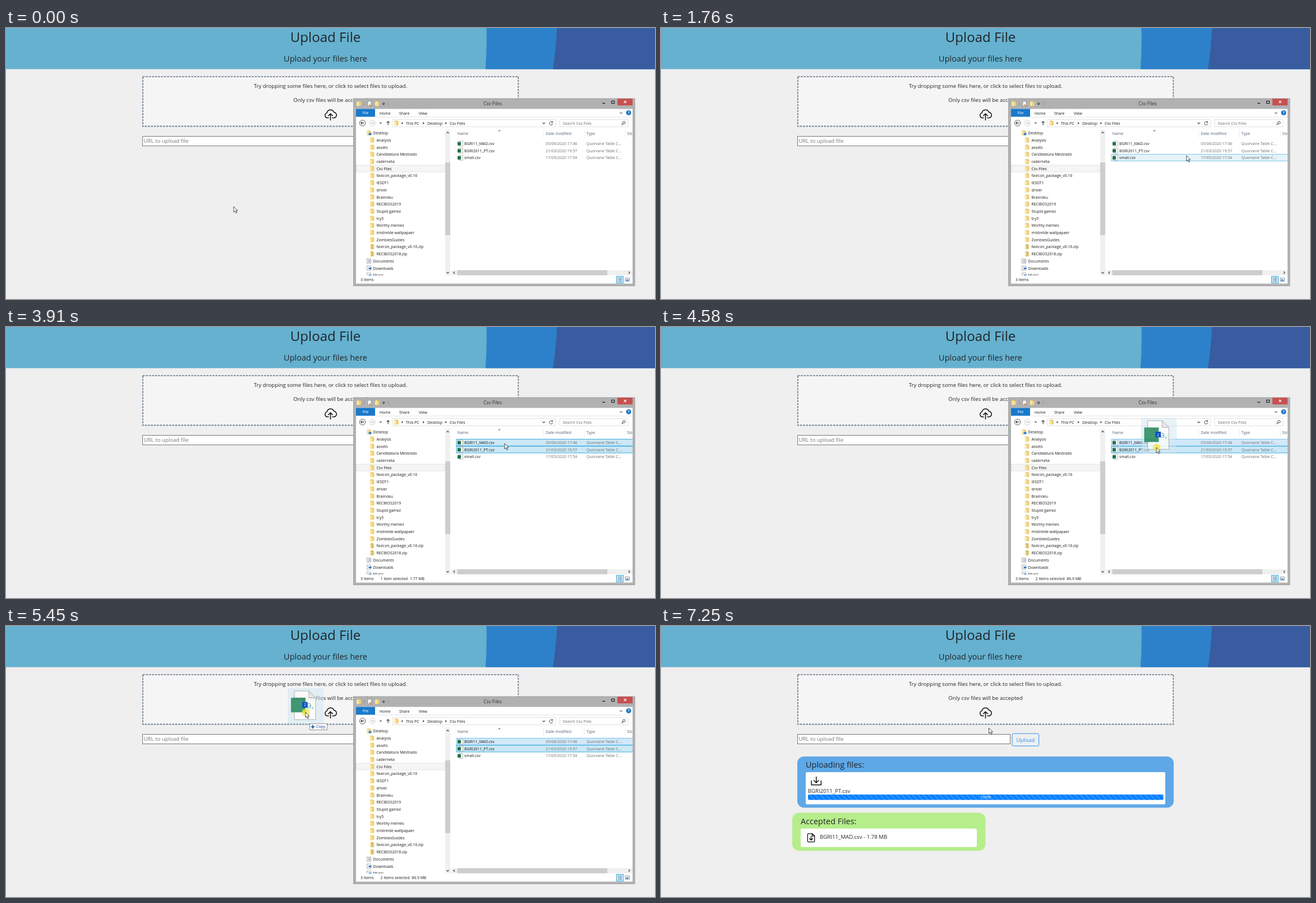
Recreate the animation shown at these times as an HTML page. Size 1157 by 484 pixels, loop 8 s.

```html
<!DOCTYPE html>
<html lang="en">
<head>
<meta charset="utf-8">
<title>Upload File</title>
<style>
html, body { margin: 0; width: 100%; height: 100%; overflow: hidden; background: #efefef; }
svg { display: block; }
text { font-family: "Open Sans", "Noto Sans", sans-serif; white-space: pre; }
#win text, #label text { font-size: 6.9px; }
</style>
</head>
<body>
<svg id="stage" width="1157" height="484" viewBox="0 0 1157 484"></svg>
<script>
const LOOP = 8000, INK = "#212529", TREE_TOP = 187.6, PITCH = 12.7, BAR = 634;
const $ = id => document.getElementById(id);

// ---- drawing helpers ----
const rect = (x, y, w, h, fill, more = "") =>
  `<rect x="${x}" y="${y}" width="${w}" height="${h}" fill="${fill}" ${more}/>`;
const text = (x, y, str, size, fill = INK, more = "") =>
  `<text x="${x}" y="${y}" style="font-size:${size}px" fill="${fill}" ${more}>${str}</text>`;
const line = (d, stroke = "#444", width = 1, more = "") =>
  `<path d="${d}" fill="none" stroke="${stroke}" stroke-width="${width}" ${more}/>`;
const shape = (d, fill, more = "") => `<path d="${d}" fill="${fill}" ${more}/>`;
const at = (x, y, body, more = "") => `<g transform="translate(${x} ${y})" ${more}>${body}</g>`;
const small = (x, y, str, fill = "#1a1a1a", size = 6.9) => text(x, y, str, size, fill);
const mid = 'text-anchor="middle"';
const round = 'stroke-linecap="round" stroke-linejoin="round"';

const folder = (x, y, zip) => at(x, y,
  shape("M1 .6L5.5 0L6.3 1L8 1.2V8.6L1 9Z", "#e3bb55") +
  shape("M.6 1.6L4.6 .8V9.3L.6 8.4Z", "#fae7a6") +
  shape("M4.6 2L8.4 1.6V8.2L4.6 9.3Z", "#f0d07a") +
  (zip ? line("M4.5 1V8.6", "#555", 1.2, 'stroke-dasharray="1 .8"') : ""));
const chevron = (x, y, dir, color = "#444") =>
  at(x, y, `<g transform="rotate(${dir})">${line("M-2.2 -1.1L0 1.1L2.2 -1.1", color, 1.1)}</g>`);
const crumb = x => shape(`M${x} 167.8l2.4 2.2l-2.4 2.2z`, "#333");

// ---- web page ----
const page =
  rect(0, 0, 1157, 73.5, "#65b1cf") +
  shape("M856.5 0Q857.6 36 854.8 73.5H1157V0Z", "#2d81cb") +
  shape("M982.3 0Q980.5 38 975 73.5H1157V0Z", "#385c9f") +
  text(569.5, 25, "Upload File", 24.1, INK, mid) +
  text(569.5, 59.8, "Upload your files here", 14.47, INK, mid) +
  rect(243.9, 86.9, 669.4, 88.6, "#f5f5f5", 'stroke="slategray" stroke-width="1.8" stroke-dasharray="3.6 1.8"') +
  text(578.5, 107.4, "Try dropping some files here, or click to select files to upload.", 9.66, INK, mid) +
  text(578.5, 131.6, "Only csv files will be accepted", 9.66, INK, mid) +
  line("M575 160.6H573A4.6 4.6 0 0 1 572.2 151.6A6.4 6.4 0 0 1 584.6 150.6A5 5 0 0 1 584 160.6H582", "#111", 1.5, round) +
  line("M578.5 164.5V153.2M574.9 156.6L578.5 153L582.1 156.6", "#111", 1.5, round) +
  rect(243.5, 193.5, 379, 17, "#fff", 'stroke="#767676"') +
  text(245.6, 205.2, "URL to upload file", 9.66, "#757575") +
  rect(626, 192.2, 47.6, 22, "none", 'rx="2.4" stroke="#3191f3"') +
  text(649.8, 206.6, "Upload", 9.7, "#2b8ef5", mid);

const item = (id, y, name) => at(0, y,
  line("M276.8 8.4V18.6M272.6 14.8L276.8 19L281 14.8M268.2 15.6V22.8H285.4V15.6", "#111", 1.5, round) +
  text(261.7, 36.6, name, 9.68) +
  at(261.8, 40,
    rect(0, 0, BAR, 9.65, "#e9ecef", 'rx="2.4"') +
    `<svg id="${id}Bar" width="0" height="9.65">
      ${rect(0, 0, BAR, 9.65, "#007bff", 'rx="2.4"')}${rect(0, 0, BAR, 9.65, "url(#stripes)", 'rx="2.4"')}
      ${text(0, 7.4, "", 7.24, "#fff", `id="${id}Pct" text-anchor="middle"`)}</svg>`),
  `id="${id}"`);

const panels =
  `<g id="uploads">
    ${rect(243, 233, 671, 149, "#5ea8e8", 'rx="12" id="upBox"')}
    ${text(258, 252.6, "Uploading files:", 14.47)}
    ${rect(258, 261, 641, 115, "#fff", 'rx="2.4" id="upList"')}
    ${line("M258 318.3H899", "#dfdfdf", .8, 'id="divider"')}
    ${item("one", 261, "BGRI11_MAD.csv")}${item("two", 318.4, "BGRI2011_PT.csv")}
  </g>
  <g id="accepted">
    ${rect(234, 333.5, 344.5, 68, "#b6ee8b", 'rx="12"')}
    ${text(249, 353.6, "Accepted Files:", 14.47)}
    ${rect(249, 361.8, 314, 33, "#fff", 'rx="2.4"')}
    ${line("M262.6 370.8H269.6L273.8 375V384.2Q273.8 385.6 272.4 385.6H262.8Q261.4 385.6 261.4 384.2V372Q261.4 370.8 262.6 370.8ZM269.4 371V375.2H273.6", "#111", 1.3, round)}
    ${line("M267.6 375.6V382M264.8 379.6L267.6 382.4L270.4 379.6", "#111", 1.4, round)}
    ${text(283, 380.4, "BGRI11_MAD.csv - 1.78 MB", 9.68)}
  </g>`;

// ---- file window ----
const TREE = ["Desktop", "Analysis", "assets", "Candidatura Mestrado", "caderneta", "Csv Files",
  "favicon_package_v0.16", "IESDT1", "driver", "Bramoku", "RECIBOS2019", "Stupid gamez", "try5",
  "Worthy memes", "mistrelde wallpapaer", "ZombiesGuides", "favicon_package_v0.16.zip",
  "RECIBOS2018.zip", "Documents", "Downloads", "Music"];
const FILES = [["BGRI11_MAD.csv", "05/06/2020 17:46"], ["BGRI2011_PT.csv", "21/03/2020 19:57"],
  ["small.csv", "17/05/2020 17:54"]];
const rowTop = i => 200.3 + 12.65 * i;

const treeRow = (name, i) => {
  const y = TREE_TOP + PITCH * i, top = i === 0 || i > 17, x = top ? 642.5 : 648;
  const icon = top && i > 17
    ? rect(x + 1, y - 4, 7, 8, "#f4f4f4", 'stroke="#999" stroke-width=".7"') +
      (i === 18 ? line(`M${x + 3} ${y - 1.6}h4m-4 1.8h4m-4 1.8h4`, "#5c7fa8", .7)
                : shape(`M${x + 4} ${y - 1}h5v3h-5z`, "#2f7fd0"))
    : folder(x, y - 4.7, name.endsWith(".zip")) + (i ? "" : rect(x + 4, y, 5, 3.6, "#2f7fd0"));
  return icon + small(top ? 654.6 : 660.5, y + 2.6, name);
};
const fileRow = ([name, date], i) => {
  const y = rowTop(i) + 6.3;
  return rect(803, rowTop(i), 320, 12, "none", `id="row${i}" stroke-width=".9"`) +
    rect(807.5, y - 4.6, 6.8, 9, "#fff", 'stroke="#9a9a9a" stroke-width=".7"') +
    rect(805, y - 3, 6, 6, "#217346") +
    small(817, y + 2.5, name) + small(962.3, y + 2.5, date, "#6d6d6d") +
    small(1034.8, y + 2.5, "Quorvane Table C...", "#6d6d6d");
};

const win = `<g id="win">
  ${rect(619.4, 126, 501.6, 334.6, "#b1b1b1", 'stroke="#979797" stroke-width=".8"')}
  ${rect(624, 144.5, 493, 312, "#fff")}
  ${folder(624.5, 130.3)}${folder(657.3, 130.3)}
  ${rect(645, 131, 6, 8, "#fff", 'stroke="#888" stroke-width=".7"')}
  ${line("M647.6 136.6L651 139.4", "#d07b2c", 1.4)}
  ${line("M638.5 131.5V138.5M681.5 131.5V138.5", "#8a8a8a", .7)}
  ${line("M671 134H675.4", "#222", .8)}${shape("M671 135.4h4.4l-2.2 2.2z", "#222")}
  ${text(867.6, 138, "Csv Files", 8.4, "#333", mid)}
  ${line("M1063.4 134.4H1068", "#111", 1.3)}
  ${rect(1079.6, 130.4, 5, 4.2, "none", 'stroke="#111"')}
  ${rect(1090, 126.2, 27, 12, "#c75050")}
  ${line("M1101.6 130L1105.8 134.2M1105.8 130L1101.6 134.2", "#fff", 1.1)}
  ${rect(624, 144.5, 34, 14, "#1979ca")}
  ${text(641, 154.3, "File", 6.9, "#fff", mid)}
  ${small(666, 154.6, "Home")}${small(701, 154.6, "Share")}${small(736, 154.6, "View")}
  ${line("M658 159H1117", "#dadbdc", .8)}
  ${chevron(1096.5, 151.8, 0, "#666")}
  <circle cx="1110" cy="151.4" r="4.5" fill="#1673c4"/>
  ${text(1110, 154.1, "?", 7.4, "#fff", mid + ' font-weight="700"')}
  <circle cx="635.6" cy="169.8" r="5.2" fill="none" stroke="#555"/>
  ${line("M638.6 169.8H632.8M635.2 167.4L632.8 169.8L635.2 172.2", "#333", 1.1)}
  <circle cx="653" cy="169.8" r="5.2" fill="none" stroke="#c4c4c4" stroke-width=".8"/>
  ${line("M650.2 169.8H655.8M653.4 167.4L655.8 169.8L653.4 172.2", "#bbb")}
  ${shape("M665.6 168.8h4.6l-2.3 2.4z", "#555")}
  ${line("M681.2 173.4V166.8M678.6 169.4L681.2 166.8L683.8 169.4", "#444", 1.2)}
  ${rect(688.9, 163.6, 291, 12.8, "none", 'stroke="#d9d9d9" stroke-width=".8"')}
  ${rect(987, 163.6, 122, 12.8, "none", 'stroke="#d9d9d9" stroke-width=".8"')}
  ${folder(691.4, 165.2)}${crumb(705.6)}${crumb(743.4)}${crumb(783.4)}
  ${small(713, 172.5, "This PC", "#1a1a1a", 7)}${small(751, 172.5, "Desktop", "#1a1a1a", 7)}${small(791, 172.5, "Csv Files", "#1a1a1a", 7)}
  ${chevron(958.8, 170, 0)}
  ${line("M974 168.2A3 3 0 1 0 974.8 170.6M974.4 166.4V168.6H972.2", "#444", 1)}
  ${small(992.6, 172.5, "Search Csv Files", "#6d6d6d", 7)}
  <circle cx="1101.8" cy="169" r="2.2" fill="none" stroke="#444"/>${line("M1100.2 170.6L1097.4 173.4", "#444", 1.2)}
  <g clip-path="url(#treeClip)">
    ${rect(624.4, 245, 157.6, 12, "#f5f5f5", 'stroke="#dedede" stroke-width=".8"')}
    ${rect(624.4, 0, 157.6, 12, "#cbe8f6", 'id="treeHot" stroke="#26a0da" stroke-width=".9"')}
    ${TREE.map(treeRow).join("")}
  </g>
  ${rect(783, 181.5, 9, 260.5, "#f0f0f0")}${rect(783, 240, 9, 130, "#cdcdcd")}
  ${chevron(787.5, 187, 180)}${chevron(787.5, 437, 0)}
  <g clip-path="url(#listClip)">
    ${small(804.8, 191.4, "Name", "#4c607a")}${small(962.3, 191.4, "Date modified", "#4c607a")}
    ${small(1034.8, 191.4, "Type", "#4c607a")}${small(1107.4, 191.4, "Size", "#4c607a")}
    ${line("M958.5 182V196M1031 182V196M1104 182V196", "#e6e6e6", .8)}
    ${shape("M877 184.2l2.5 -2.2l2.5 2.2z", "#777")}
    ${FILES.map(fileRow).join("")}
  </g>
  ${rect(793.5, 432.6, 323.5, 9, "#f0f0f0")}${rect(804.5, 432.6, 267.5, 9, "#cdcdcd")}
  ${chevron(799, 437, 90)}${chevron(1111, 437, -90)}
  ${small(632, 452, "3 items")}${text(667.8, 452, "", 6.9, "#1a1a1a", 'id="status"')}
  ${rect(1088.4, 443.4, 12, 12, "#cbe8f6", 'stroke="#26a0da" stroke-width=".9"')}
  ${line("M1091 446.6h1.6m1 0h4M1091 449.4h1.6m1 0h4M1091 452.2h1.6m1 0h4", "#456", .9)}
  ${rect(1104, 446.6, 7.4, 5.6, "#fff", 'stroke="#678" stroke-width=".8"')}
  ${rect(1105.4, 449, 4.6, 2.4, "#3c87cc")}
</g>`;

// ---- pointer and dragged files ----
const pointer =
  `<g id="drag">
    <g opacity=".85">
      ${rect(-31, -48, 62, 62, "#d3e7f2", 'opacity=".6" stroke="#b3d3e6" stroke-width=".8"')}
      ${shape("M-20 -44H6L18 -32V7H-20Z", "#fbfbfb", 'stroke="#9c9c9c" stroke-width=".9"')}
      ${shape("M6 -44V-32H18Z", "#e6e6e6", 'stroke="#9c9c9c" stroke-width=".9"')}
      ${text(2, -13, "a,", 16, "#45b3a6")}
      ${rect(-26, -32, 26, 26, "#21875a")}
    </g>
    ${rect(-6, -24.4, 9.6, 10, "#0a4fc4")}
    ${text(-1.2, -16.8, "2", 7.4, "#fff", mid)}
    <g id="label" transform="translate(7.4 14.2)">
      ${rect(0, 0, 32, 11.2, "#fff", 'id="tip" stroke="#8a8a8a" stroke-width=".9"')}
      ${line("M2.4 5.6H8.2M5.6 2.9L8.4 5.6L5.6 8.3", "#0a4fa8", 1.5, 'id="moveIcon"')}
      ${line("M2.2 5.6H8.8M5.5 2.3V8.9", "#0a4fa8", 1.7, 'id="copyIcon"')}
      ${text(11.6, 8.1, "", 6.9, "#17367f", 'id="tipText"')}
    </g>
  </g>
  <g id="cursor">
    <circle id="press" r="7" cx=".6" cy=".6" fill="#f3e64c" opacity=".8"/>
    ${shape("M0 0V9.8L2.3 7.7L4 11.6L5.6 10.9L4 7.2H7Z", "#fff", 'stroke="#222" stroke-width=".8"')}
  </g>`;

$("stage").innerHTML = `<defs>
  <pattern id="stripes" width="9.65" height="9.65" patternUnits="userSpaceOnUse">
    <g transform="scale(9.65)">${shape("M0 .5L.5 1H0ZM0 0L1 1V.5L.5 0Z", "#fff", 'opacity=".15"')}</g>
  </pattern>
  <clipPath id="treeClip">${rect(624, 181.5, 159, 260.5, "#000")}</clipPath>
  <clipPath id="listClip">${rect(793, 181, 324, 252, "#000")}</clipPath>
</defs>` + page + panels + win + pointer;

// ---- motion ----
const PATH = [[0, 406, 319], [710, 406, 319], [1000, 600, 322], [1300, 880, 292], [1510, 986, 257],
  [1760, 937, 228], [1960, 903, 211], [2160, 890, 206], [3020, 890, 206], [3220, 903, 243],
  [3490, 898, 217], [3690, 898, 217], [3910, 889, 208], [4400, 889, 210], [4520, 889, 210],
  [4730, 838, 248], [4900, 719, 296], [4930, 694, 301], [5080, 606, 278], [5300, 535, 200],
  [5450, 534, 154], [5570, 537, 140], [6030, 537, 140], [6350, 536.5, 150], [6810, 584.5, 182], [LOOP, 584.5, 182]];
const WIDTH1 = [[6180, 0], [6350, 47], [6480, 82], [6620, 96], [6780, 100], [LOOP, 100]];
const WIDTH2 = [[6290, 0], [6350, 1.65], [6500, 13], [6650, 29], [6850, 66], [7000, 88], [7130, 97], [7250, 100], [LOOP, 100]];
const PCT2 = [[0, 16], [6420, 34], [6530, 58], [6620, 81], [6700, 100]];

// Cubic through the points, flat at rests and turning points.
function curve(pts, t, k) {
  let i = 0;
  while (i < pts.length - 2 && t >= pts[i + 1][0]) i++;
  const slope = j => pts[j] && pts[j + 1] ? (pts[j + 1][k] - pts[j][k]) / (pts[j + 1][0] - pts[j][0]) : 0;
  const tangent = j => {
    const a = slope(j - 1), b = slope(j);
    return a * b <= 0 ? 0 : 2 * a * b / (a + b);
  };
  const h = pts[i + 1][0] - pts[i][0], u = Math.min(1, Math.max(0, (t - pts[i][0]) / h));
  const s = u * u * (3 - 2 * u);
  return pts[i][k] * (1 - s) + pts[i + 1][k] * s +
    h * u * (1 - u) * (tangent(i) * (1 - u) - tangent(i + 1) * u);
}
const spot = t => [curve(PATH, t, 1), curve(PATH, t, 2)];
const held = (steps, t) => steps.filter(s => s[0] <= t).pop()[1];
const within = (t, a, b) => t >= a && t < b;
const show = (id, on) => { $(id).style.display = on ? "" : "none"; };
const set = (id, attrs) => { for (const k in attrs) $(id).setAttribute(k, attrs[k]); };
const move = (id, x, y) => set(id, { transform: `translate(${x} ${y})` });
const write = (id, str) => { if ($(id).textContent !== str) $(id).textContent = str; };

function progress(id, percent, label) {
  const w = BAR * percent / 100;
  write(id + "Pct", label + "%");
  set(id + "Bar", { width: w });
  set(id + "Pct", { x: Math.max(w / 2, 7) });
}

function paintRows(t, x, y) {
  FILES.forEach((_, i) => {
    const hot = x > 803 && x < 1117 && y >= rowTop(i) && y < rowTop(i + 1) && t < 4420;
    const picked = t >= [2720, 3690, Infinity][i];
    const strong = picked && (hot || i === 1);
    set("row" + i, {
      fill: strong ? "#cbe8f6" : picked ? "#d1e8fa" : hot ? "#e5f3fb" : "none",
      stroke: strong ? "#26a0da" : picked || hot ? "#70c0e7" : "none"
    });
  });
  write("status", t < 2720 ? "" : t < 3950 ? "1 item selected  1.77 MB" : "2 items selected  86.9 MB");
}

function paintDrag(t, x, y) {
  const dragging = within(t, 4450, 5830);
  const inTree = dragging && x > 624 && x < 783 && y > 182 && y < 442;
  const row = Math.round((y - TREE_TOP) / PITCH), onPage = x < 619;
  show("drag", dragging);
  show("treeHot", inTree);
  if (!dragging) return;
  if (inTree) set("treeHot", { y: TREE_TOP + PITCH * row - 6 });
  move("drag", ...spot(t - 30));
  set("drag", { opacity: Math.min(1, (t - 4450) / 100) });
  show("label", inTree || onPage);
  show("moveIcon", inTree);
  show("copyIcon", onPage);
  write("tipText", inTree ? "Move to " + TREE[row] : "Copy");
  if (inTree || onPage) set("tip", { width: $("tipText").getComputedTextLength() + 15 });
}

function paintUploads(t) {
  const done = t >= 6840;
  show("uploads", t >= 6180);
  show("accepted", done);
  show("one", !done);
  show("divider", !done);
  set("upBox", { height: done ? 91.5 : 149 });
  set("upList", { height: done ? 57.4 : 115 });
  move("two", 0, done ? 261 : 318.4);
  progress("one", curve(WIDTH1, t, 1), 100);
  progress("two", curve(WIDTH2, t, 1), held(PCT2, t));
}

function render(t) {
  const [x, y] = spot(t);
  show("win", t < 6030);
  move("cursor", x, y);
  show("press", within(t, 2720, 2790) || within(t, 3690, 3760) || within(t, 4420, 5830));
  paintRows(t, x, y);
  paintDrag(t, x, y);
  paintUploads(t);
}

const start = performance.now();
function tick() {
  render((performance.now() - start) % LOOP);
  requestAnimationFrame(tick);
}
tick();
</script>
</body>
</html>
```
